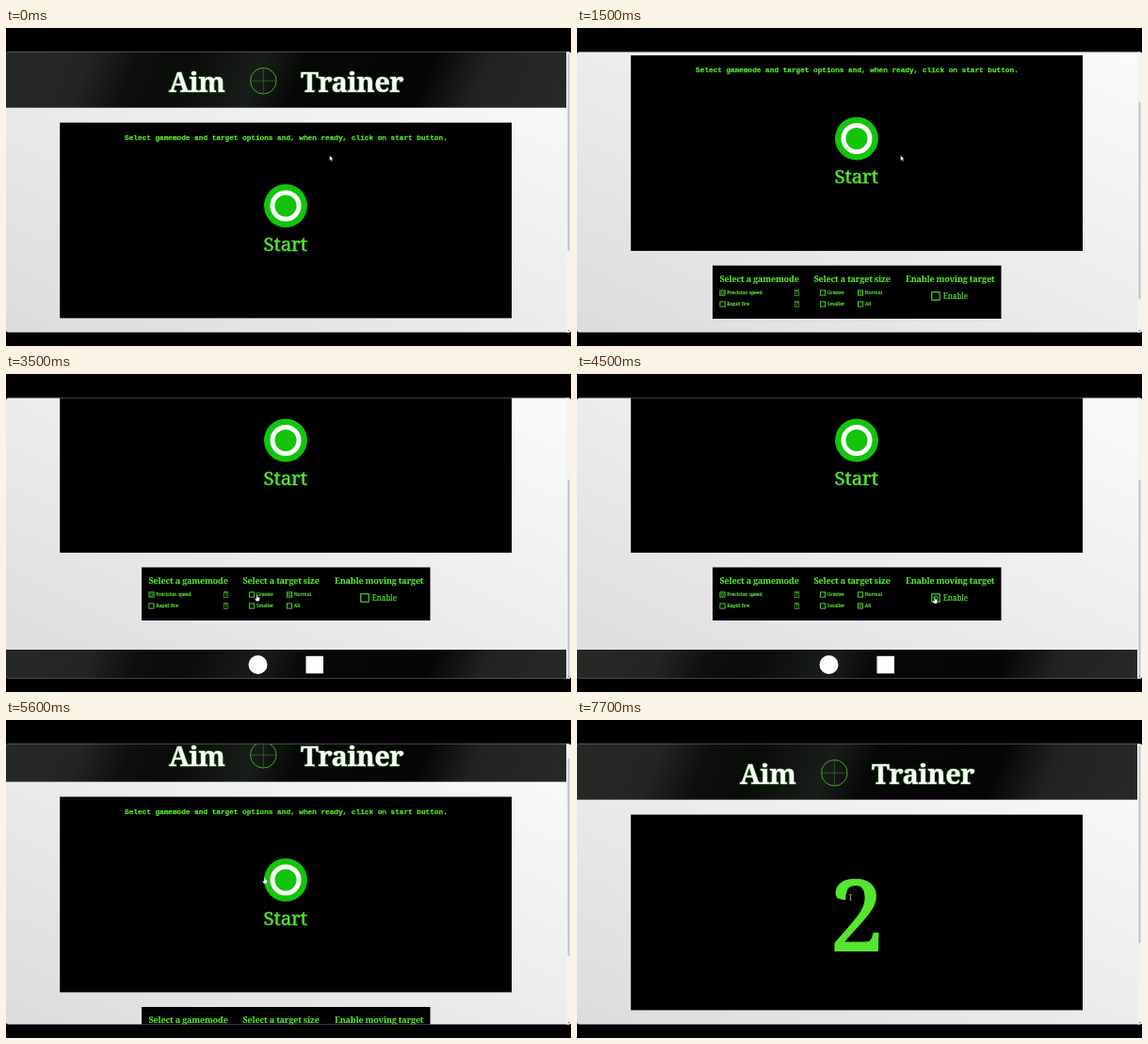
Recreate the animation shown at these times as an HTML page. Size 600 px wide and 338 px high, loop 8 s.

```html
<!DOCTYPE html>
<html lang="en">
<head>
<meta charset="utf-8">
<title>Aim Trainer</title>
<style>
  html, body { margin: 0; height: 100%; overflow: hidden; background: #000; }
  svg { display: block; width: 100vw; height: 100vh; }
  text { font-family: "Noto Serif", serif; fill: #55e62f; stroke: #55e62f; stroke-width: 0; }
  .title { font: bold 29px "Noto Serif", serif; letter-spacing: -.45px; fill: #fff; stroke: #3c9a2c; stroke-width: 1.2px; paint-order: stroke; }
  .hint { font: bold 7.72px "Liberation Mono", monospace; stroke-width: .25px; }
  .start { font-size: 20.5px; letter-spacing: -.1px; stroke-width: .5px; }
  .head { font-size: 9px; font-weight: bold; letter-spacing: -.17px; stroke-width: .1px; }
  .label { font-size: 5.2px; letter-spacing: -.08px; stroke-width: .2px; }
  .big { font-size: 8px; stroke-width: .2px; }
  .count { font-size: 104px; text-anchor: middle; stroke-width: 1.8px; }
  .box { fill: none; stroke: #55e62f; }
</style>
</head>
<body>
<svg viewBox="0 0 600 338" preserveAspectRatio="none">
  <defs>
    <linearGradient id="paper" x1="1" y1="0" x2="0" y2="1">
      <stop stop-color="#fbfbfb"/><stop offset=".5" stop-color="#ececec"/><stop offset="1" stop-color="#dcdcdc"/>
    </linearGradient>
    <linearGradient id="metal" gradientUnits="userSpaceOnUse" x1="0" y1="55" x2="517" y2="262">
      <stop stop-color="#262826"/><stop offset=".13" stop-color="#232523"/><stop offset=".22" stop-color="#0d0f0d"/>
      <stop offset=".31" stop-color="#0a0c0a"/><stop offset=".44" stop-color="#191d19"/><stop offset=".52" stop-color="#060706"/>
      <stop offset=".74" stop-color="#040504"/><stop offset=".84" stop-color="#212321"/><stop offset="1" stop-color="#272927"/>
    </linearGradient>
    <clipPath id="view"><rect y="25.6" width="600" height="298" rx="2.5"/></clipPath>
  </defs>
  <rect width="600" height="338"/>
  <rect y="24.5" width="600" height="1.5" fill="#0d0d17"/>
  <g clip-path="url(#view)">
    <rect y="25" width="600" height="299" fill="url(#paper)"/>
    <g id="page">
      <rect id="band" y="25" width="595" height="59.7" fill="url(#metal)"/>
      <text class="title" x="173" y="68">Aim</text>
      <text class="title" x="313" y="68">Trainer</text>
      <g fill="none" stroke="#48b534">
        <circle cx="273.3" cy="56.2" r="13.8" stroke-width=".9"/>
        <path d="M259.5 56.2h27.6M273.3 42.4v27.6" stroke="#348a28" stroke-width=".6"/>
      </g>
      <rect x="57.2" y="100.6" width="479.8" height="207.8"/>
      <g id="menu">
        <text class="hint" x="126" y="118.6">Select gamemode and target options and, when ready, click on start button.</text>
        <circle cx="297" cy="189" r="23" fill="#13c40a"/>
        <circle cx="297" cy="189" r="14" fill="none" stroke="#fff" stroke-width="5"/>
        <text class="start" x="273.5" y="236.6">Start</text>
      </g>
      <text class="count" id="count" x="297" y="244.5"></text>
      <rect x="144" y="324" width="306.5" height="56.5"/>
      <g id="options">
        <text class="head" x="151.5" y="341.3">Select a gamemode</text>
        <text class="head" x="251.5" y="341.3">Select a target size</text>
        <text class="head" x="349" y="341.3">Enable moving target</text>
      </g>
      <use href="#band" y="386.5"/>
      <circle cx="267.5" cy="427.5" r="10" fill="#fff"/>
      <rect x="318.5" y="418.3" width="18.5" height="18.5" fill="#fff"/>
    </g>
    <rect x="595" y="25" width="5" height="299" fill="#f3f3f3"/>
    <rect id="thumb" x="596.5" y="27" width="2" height="210" rx="1" fill="#bcc3cb"/>
    <path d="M596.3 321l1.2 1.2 1.2-1.2z" fill="#555"/>
  </g>
  <g id="cursor">
    <path id="arrow" d="M0 0V5.4L1.3 4.3 2.1 6.2 3.1 5.7 2.3 3.9H4z" fill="#fff" stroke="#111" stroke-width=".3"/>
    <path id="hand" d="M-.6 .2Q0-.5.6.2V2.4L2.9 3V5L2.2 7H-.9L-2.3 4.2Q-2 3.4-.6 4.3z" fill="#fff" stroke="#111" stroke-width=".3"/>
    <path id="beam" d="M-1.2-2.8H1.2M0-2.8V2.8M-1.2 2.8H1.2" fill="none" stroke="#ccc" stroke-width=".7"/>
  </g>
</svg>
<script>
const $ = id => document.getElementById(id);
const LOOP = 8000, STEP = 100, CLICK = 6500, TWO = 7500;

// [time, scroll offset]
const scrollKeys = [[1000, 0], [1100, 1], [1200, 10], [1400, 50], [1500, 71.5], [1700, 109], [1800, 118.5],
  [4600, 118.5], [4900, 92], [5600, 19], [5800, 4], [5900, 0]];
// [time, x, y] of the pointer tip
const pointerKeys = [[1900, 343.7, 135.5], [2600, 379, 237], [2900, 379, 237], [3300, 266.5, 234.5], [3600, 266.5, 234.5],
  [3800, 262, 245], [3900, 262, 245], [4100, 302, 245], [4200, 302, 245], [4400, 380, 237], [4500, 380, 237],
  [4900, 277.7, 203], [5500, 274.7, 166.5], [5900, 274.7, 168], [6200, 290.5, 188.3]];

// label, box x, box y, whether checked at a given time
const options = [
  ["Precision speed", 154.5, 353, () => true],
  ["Rapid fire", 154.5, 365, () => false],
  ["Greater", 261, 353, t => t >= 3600 && t < 3900],
  ["Normal", 301, 353, t => t < 3600],
  ["Smaller", 261, 365, t => t >= 3900 && t < 4200],
  ["All", 301, 365, t => t >= 4200],
  ["Enable", 381, 356.5, t => t >= 4500]
];

function add(tag, attrs, content = "") {
  const el = document.createElementNS("http://www.w3.org/2000/svg", tag);
  for (const k in attrs) el.setAttribute(k, attrs[k]);
  el.textContent = content;
  return $("options").appendChild(el);
}

const marks = options.map(([name, x, y], i) => {
  const big = i === 6, r = big ? 4.2 : 2.6;
  add("rect", { class: "box", x: x - r, y: y - r, width: 2 * r, height: 2 * r, "stroke-width": big ? 1.1 : .9 });
  add("text", { class: big ? "big" : "label", x: x + (big ? 7.8 : 4.7), y: y + (big ? 3 : 1.8) }, name);
  return add("circle", { class: "box", cx: x, cy: y, r: r * .5, "stroke-width": big ? 1 : .7 });
});
for (const y of [353, 365]) {
  add("rect", { class: "box", x: 231.2, y: y - 2.8, width: 4.6, height: 5.6, "stroke-width": .6 });
  add("text", { class: "label", x: 232.3, y: y + 1.8 }, "?");
}

function at(keys, t) {
  const next = keys.findIndex(k => k[0] > t);
  if (next === 0) return keys[0].slice(1);
  if (next < 0) return keys[keys.length - 1].slice(1);
  const a = keys[next - 1], b = keys[next], u = (t - a[0]) / (b[0] - a[0]);
  return a.slice(1).map((v, i) => v + (b[i + 1] - v) * u);
}

const show = (el, on) => el.setAttribute("visibility", on ? "visible" : "hidden");

function draw(now) {
  const t = Math.floor(now % LOOP / STEP) * STEP;
  const [scroll] = at(scrollKeys, t), [x, y] = at(pointerKeys, t);
  const started = t >= CLICK, pageY = y + scroll;

  $("page").setAttribute("transform", `translate(0 ${-scroll})`);
  $("thumb").setAttribute("y", 27 + scroll * .72);
  show($("menu"), !started);
  $("count").textContent = started ? (t < TWO ? "3" : "2") : "";
  marks.forEach((m, i) => show(m, options[i][3](t)));

  const onStart = Math.hypot(x - 297, pageY - 189) < 24;
  const onOption = pageY > 349 && pageY < 369 && (x > 257 && x < 328 || x > 376 && x < 416);
  const hand = !started && (onStart || onOption);
  $("cursor").setAttribute("transform", `translate(${x} ${y})`);
  show($("beam"), started);
  show($("hand"), hand);
  show($("arrow"), !started && !hand);
  requestAnimationFrame(() => draw(performance.now()));
}
draw(performance.now());
</script>
</body>
</html>
```
